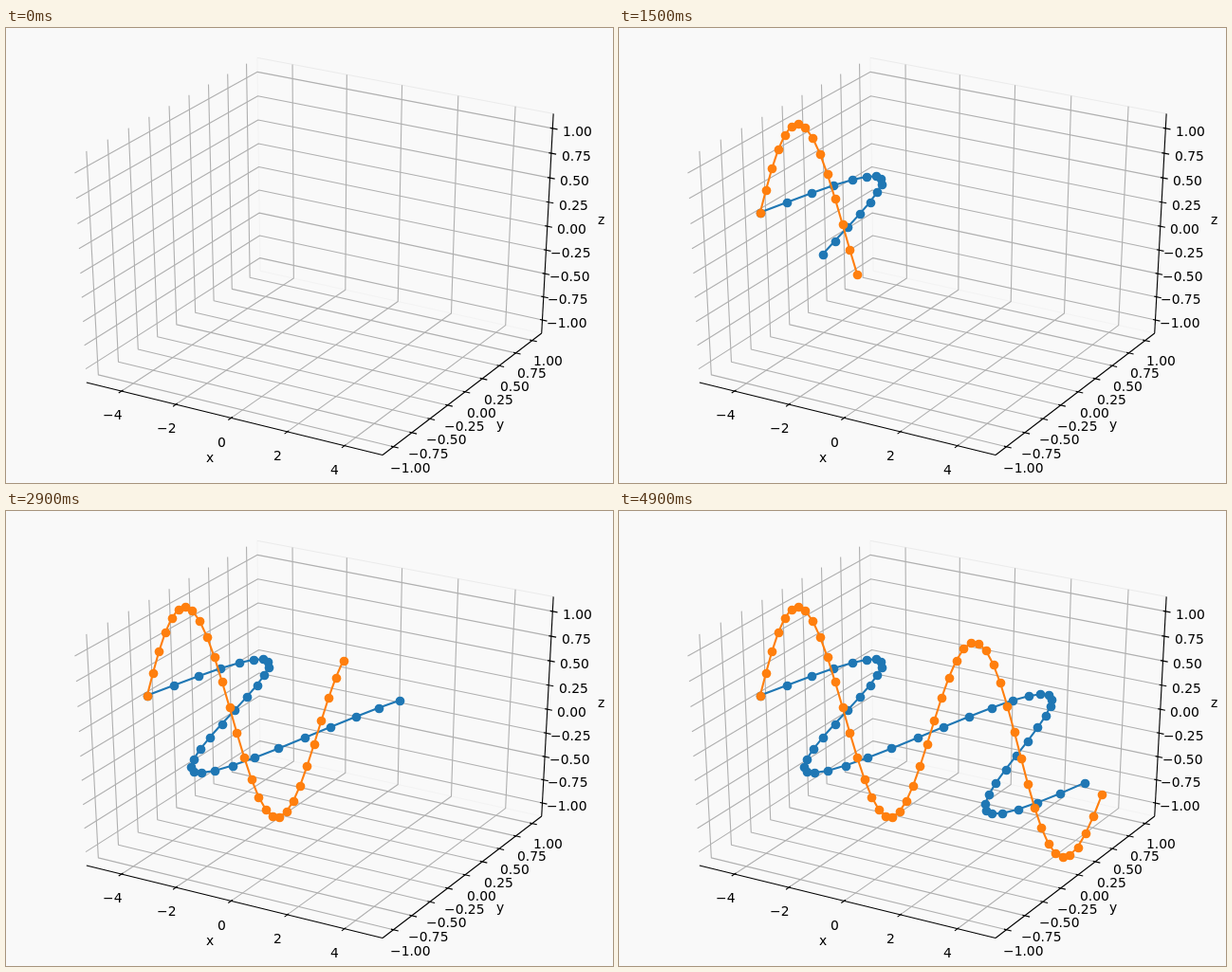
These frames come from a looping animation (640x480 px, 5 s). An HTML page with a canvas:

```html
<!DOCTYPE html>
<html>
<head>
<meta charset="utf-8">
<style>
html, body { margin: 0; overflow: hidden; background: #f9f9f9; }
canvas { display: block; }
</style>
</head>
<body>
<canvas id="stage" width="640" height="480"></canvas>
<script>
const g = document.getElementById('stage').getContext('2d');
const H = 0.5 + 1 / 48;                 // half size of the drawn box
const RANGE = [10.2, 2.2, 2.2];         // axis spans in data units
const PT = 100 / 72;                    // pixels per point
const COUNT = 50, FRAME = 100;
const S = Math.sqrt(3) / 2;

// Perspective view of the unit cube: elevation 30°, azimuth -60°
function project([x, y, z]) {
  const depth = 10 - (S / 2 * x - 0.75 * y + 0.5 * z);
  const px = (S * x + 0.5 * y) / depth;
  const py = (-0.25 * x + S / 2 * y + S * z) / depth;
  return [(px + 0.095) / 0.185 * 640, 480 - (py + 0.095) / 0.185 * 480];
}

function line(points, color, width) {
  g.beginPath();
  points.forEach(p => g.lineTo(...project(p)));
  g.strokeStyle = color;
  g.lineWidth = width;
  g.stroke();
}

function label(str, p, drop) {
  const [x, y] = project(p);
  g.fillStyle = '#000';
  g.fillText(str, Math.round(x - g.measureText(str).width / 2), Math.round(y + drop));
}

// side: the edge carrying the axis, with the signs of its two fixed coordinates
// wall: the corner path of a grid line, tick: the coordinate ticks run along
const axes = [
  { name: 'x', dim: 0, step: 2, digits: 0, side: [0, -1, -1], tick: 1,
    wall: [[0, -1, -1], [0, 1, -1], [0, 1, 1]] },
  { name: 'y', dim: 1, step: 0.25, digits: 2, side: [1, 0, -1], tick: 0,
    wall: [[1, 0, -1], [-1, 0, -1], [-1, 0, 1]] },
  { name: 'z', dim: 2, step: 0.25, digits: 2, side: [1, 1, 0], tick: 0,
    wall: [[-1, -1, 0], [-1, 1, 0], [1, 1, 0]] }
];

function drawAxis({ name, dim, step, digits, side, tick, wall }) {
  const at = (signs, v, size = H) => signs.map((s, i) => i === dim ? v : s * size);
  const max = 4 * step / (dim ? 1 : 2);
  const ticks = [];
  for (let v = -max; v <= max; v += step) ticks.push(v);

  for (const v of ticks) {
    line(wall.map(w => at(w, v / RANGE[dim])), '#b0b0b0', 0.8 * PT);
  }
  line([at(side, -H), at(side, H)], '#000', 0.8 * PT);
  for (const v of ticks) {
    const u = v / RANGE[dim];
    const ends = [-0.1, 0.2].map(d => {
      const p = at(side, u);
      p[tick] += side[tick] * d / 12;
      return p;
    });
    line(ends, '#000', 0.8 * PT);
    label(v.toFixed(digits).replace('-', '\u2212'), at(side, u, H + 0.05704), 10.5);
  }
  label(name, at(side, 0, H + 0.124), 3.84);
}

function drawScene() {
  g.fillStyle = '#f9f9f9';
  g.fillRect(0, 0, 640, 480);
  g.font = 10 * PT + 'px "DejaVu Sans", sans-serif';
  g.lineJoin = 'round';
  line([[-H, H, H], [-H, H, -H], [H, H, -H]], '#f3f3f3', 1);
  line([[-H, H, H], [H, H, H]], '#ebebeb', 1);
  axes.forEach(drawAxis);
}

function curve(n, color, place) {
  const pts = Array.from({ length: n }, (_, i) => {
    const x = -2 * Math.PI + i * 4 * Math.PI / (COUNT - 1);
    return place(x / RANGE[0], Math.sin(x) / RANGE[1]);
  });
  line(pts, color, 1.5 * PT);
  g.fillStyle = color;
  for (const p of pts) {
    const [x, y] = project(p).map(c => Math.round(c) + 0.5);
    g.beginPath();
    g.arc(x, y, 3.5 * PT, 0, 2 * Math.PI);
    g.fill();
  }
}

const start = performance.now();
function draw() {
  const n = Math.floor((performance.now() - start) / FRAME) % COUNT;
  drawScene();
  curve(n, '#1f77b4', (x, s) => [x, s, 0]);
  curve(n, '#ff7f0e', (x, s) => [x, 0, s]);
  requestAnimationFrame(draw);
}
draw();
</script>
</body>
</html>
```
